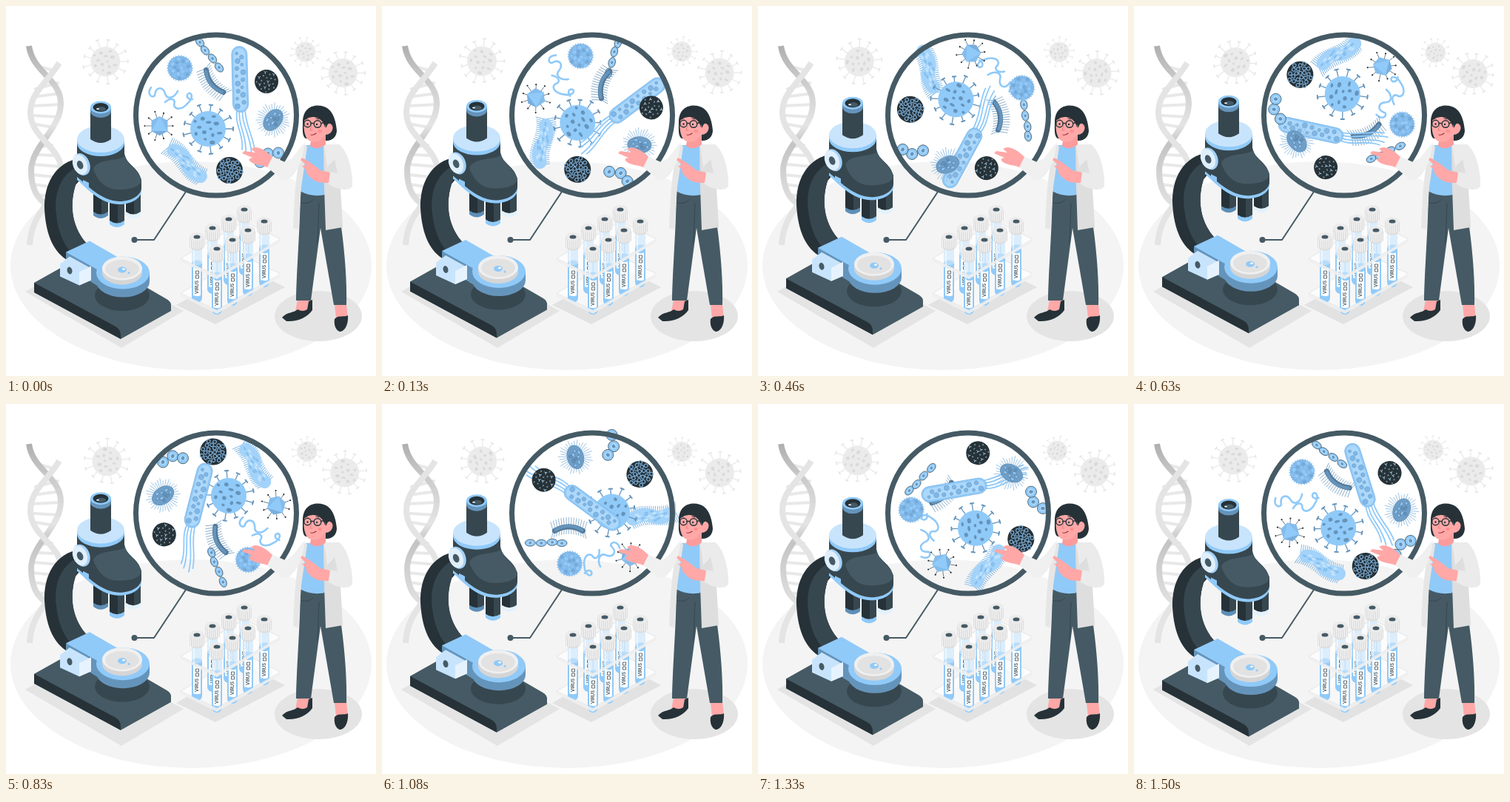
An HTML page that plays this animation: 500x500 px, repeating every 1.54 s.

```html
<!DOCTYPE html>
<html lang="en">
<head>
<meta charset="utf-8">
<title>Virus laboratory</title>
<style>
  html, body { margin: 0; height: 100%; overflow: hidden; background: #fff; }
  svg { display: block; width: 100vw; height: 100vh; }
</style>
</head>
<body>
<svg id="stage" viewBox="0 0 500 500"></svg>
<script>
const BLUE = '#90caf9', PALE = '#c8e4fc', DEEP = '#6594bb', INK = '#263238', SLATE = '#37474f', STEEL = '#455a64', SKIN = '#ffa8a7';
const HUB = [285.5, 144];

const path = (d, fill, extra = '') => `<path d="${d}" fill="${fill}" ${extra}/>`;
const line = (d, color, w = 1, cap = 'round') => path(d, 'none', `stroke="${color}" stroke-width="${w}" stroke-linecap="${cap}" stroke-linejoin="round"`);
const oval = (x, y, rx, ry, fill, extra = '') => `<ellipse cx="${x}" cy="${y}" rx="${rx}" ry="${ry}" fill="${fill}" ${extra}/>`;
const dot = (x, y, r, fill, extra) => oval(x, y, r, r, fill, extra);
const group = (transform, body) => `<g transform="${transform}">${body}</g>`;
const times = (n, f) => Array.from({ length: n }, (_, i) => f(i)).join('');
const spinner = (x, y, body, orbit = 0) => `<g class="spin" data-x="${x}" data-y="${y}" data-orbit="${orbit}">${body}</g>`;
const germ = (x, y, body) => spinner(x, y, body, 1);

// Evenly spread points on a disc (sunflower spiral)
const scatter = (n, r, f) => times(n, i => {
  const a = i * 2.4, d = r * Math.sqrt((i + .4) / n);
  return f(d * Math.cos(a), d * Math.sin(a), i);
});
const rays = (n, f) => times(n, i => group(`rotate(${i * 360 / n})`, f(i)));

function virus(r, reach, body, spot, spike) {
  const k = r / 24;
  return rays(13, i => {
    const tip = reach - (i % 3) * 1.5 * k;
    return line(`M${r - 1} 0H${tip}`, spike, 1.3 * k) + line(`M${tip} ${-2.2 * k}v${4.4 * k}`, spike, 2 * k);
  }) + dot(0, 0, r, body) +
    scatter(13, r * .86, (x, y, i) => oval(x, y, (2.2 + i % 3 * .7) * k, (1.8 + i % 2 * .8) * k, spot));
}

function dna() {
  const rungs = [[46, 82, 60, 86], [40, 112, 70, 104], [36, 123, 74, 118], [35, 135, 75, 133], [36, 148, 73, 150], [41, 160, 64, 164],
    [48, 190, 62, 188], [42, 201, 68, 202], [37, 214, 73, 217], [36, 228, 74, 232], [37, 241, 72, 246], [43, 255, 66, 258]];
  return rungs.map(([a, b, c, d]) => line(`M${a} ${b}L${c} ${d}`, '#e8e8e8', 4)).join('') +
    line('M31 54C36 90 74 98 74 132C74 166 34 190 34 222C34 248 43 260 54 268', 'url(#strand)', 8, 'butt') +
    line('M72 77C52 108 32 118 33 146C35 180 75 190 75 224C75 258 34 274 32 323', '#e4e4e4', 8, 'butt');
}

function tube(x, y) {
  return path(`M${x - 7} ${y + 12}v70a7 7 0 0 0 14 0v-70z`, '#d7ecfc', 'opacity=".85"') +
    path(`M${x - 7} ${y + 36}v46a7 7 0 0 0 14 0v-46z`, BLUE) + oval(x, y + 35, 7, 3.5, '#b9dcf9') +
    path(`M${x - 4} ${y + 16}v64`, 'none', 'stroke="#fff" stroke-width="1.5" opacity=".7"') +
    path(`M${x - 5} ${y + 41}q5 4 10 1v37q-5 3-10-1z`, '#fff') +
    `<text transform="translate(${x + 2.4} ${y + 77}) rotate(-90)" font-family="Inter,sans-serif" font-size="6" font-weight="500" fill="${INK}">VIRUS</text>` +
    path(`M${x - 1.5} ${y + 46}h4v4h-4zM${x - 1.5} ${y + 52}h4v4h-4z`, 'none', `stroke="${INK}" stroke-width=".7"`) +
    path(`M${x - 10} ${y}v14q10 9 20 0v-14z`, '#dcdcdc') +
    times(7, i => line(`M${x - 8.5 + i * 2.8} ${y + 4}v${11 + (i > 1 && i < 5)}`, '#f5f5f5', 1.2)) +
    oval(x, y, 10, 6, '#ebebeb') + oval(x, y, 4.5, 2.6, STEEL);
}

function rack() {
  const plate = y => path(`M236 ${y}L322 ${y - 50}L371 ${y - 26}L285 ${y + 23}z`, '#fff', 'stroke="#e0e0e0" opacity=".75"');
  const edge = y => path(`M236 ${y}L285 ${y + 23}L371 ${y - 26}v4L285 ${y + 28}L236 ${y + 4}z`, '#f0f0f0', 'opacity=".9"');
  const tubes = [[322, 275], [301, 288], [279, 300], [258, 312], [349, 291], [327, 303], [306, 316], [285, 328]];
  return path('M230 404L322 352L377 380L283 430z', '#e2e2e2') + plate(388) + plate(341) +
    tubes.map(p => tube(...p)).join('') + edge(388) + edge(341);
}

function objective(x, y, h, tip) {
  return path(`M${x - 10} ${y}v${h}q10 7 20 0v-${h}z`, INK) + path(`M${x + 1} ${y}v${h + 3}q6 0 9-3v-${h}z`, SLATE) +
    path(`M${x - 10} ${y + h - 3}q10 7 20 0v5q-10 8-20 0z`, tip);
}

function microscope() {
  return path('M38 374L104 337Q110 334 117 338L217 396Q224 400 223 406V412L155 450L38 387z', STEEL) +
    path('M38 374L148 433Q155 437 155 445V450L38 387z', INK) +
    oval(157, 391, 37, 21, SLATE) +
    path('M102 205C65 211 51 242 52 275C54 312 66 334 84 344L110 322C92 303 84 274 94 242L106 228z', INK) +
    path('M104 214C75 224 64 251 68 282C71 309 80 326 92 337L110 322C92 303 84 274 94 242z', SLATE) +
    group('translate(0 1.5)',
      path('M81 331L113 316L160 343L124 366z', BLUE) + path('M81 331L124 355V377L81 350z', DEEP) +
      path('M73 347L86 337L115 353V369L99 376L73 364z', PALE) + path('M99 358L115 350V369L99 376z', '#e6f3fe') +
      oval(86, 356, 3.4, 5, STEEL, 'transform="rotate(-15 86 356)"') +
      path('M122 358V371A36 21 0 0 0 194 371V358z', DEEP) + oval(158, 359, 36, 22, BLUE) +
      path('M130 353V359A27 16 0 0 0 184 359V353z', '#d5d5d5') + oval(157, 353, 27, 16, '#f0f0f0') +
      oval(157, 354, 23, 12.5, '#e2e2e2') + oval(157, 355, 6, 4, BLUE) + dot(166, 359, 1.5, BLUE) + oval(159, 354, 2, 1.2, '#fff')) +
    objective(172, 252, 29, '#e3f2fd') + objective(128, 252, 29, '#5d8fb8') + objective(150, 258, 35, BLUE) +
    path('M96 190V235C110 247 128 268 153 268C172 268 183 258 183 250V237C178 216 163 216 160 199V186z', BLUE) +
    path('M96 186V231C110 242 128 263 153 264C172 264 183 254 183 246V235C178 216 163 216 160 199V186z', SLATE) +
    path('M118 220C124 206 150 210 161 203C164 215 178 220 183 235C183 243 169 249 150 248C132 247 122 233 118 220z', STEEL) +
    path('M96 180V185A32 18 0 0 0 160 185V180z', BLUE) + oval(128, 180, 32, 18, PALE) +
    path('M114 139V180Q128 190 142 180V139z', SLATE) +
    path('M114 137V142A14 9 0 0 0 142 142V137z', DEEP) + oval(128, 137, 14, 8.5, BLUE) + oval(128, 137, 10.5, 6, INK) +
    oval(129, 139, 6, 3, STEEL) + oval(124, 139, 2, 1, '#e3f2fd') +
    group('translate(102 214) rotate(-22)', oval(0, 0, 11, 15.5, '#a4d1f7') + oval(-2, -.5, 9.5, 14, '#e0effc') + oval(-2, 0, 4, 6, STEEL)) +
    path('M104 235L112 239V245L104 241z', BLUE);
}

function woman() {
  return path('M394 397L410 397L406 413L391 413z', SKIN) + path('M444 403L460 403L462 422L446 422z', SKIN) +
    path('M373 421C380 413 389 415 394 410Q401 414 407 410L409 399L414 397V411C407 421 394 427 379 426z', INK) +
    path('M444 423C449 417 458 421 462 418C463 430 458 440 451 440C445 438 443 430 444 423z', INK) +
    path('M398 250L432 252L453 298C458 335 461 375 460 404L443 404L425 300L412 398L392 398C393 350 397 310 398 250z', STEEL) +
    line('M423 267L421 320', SLATE) + line('M399 266Q410 268 415 262', SLATE) +
    path('M405 188L430 187L434 254Q416 260 397 250z', BLUE) +
    path('M404 187C394 208 391 232 388 300L395 302L399 245L407 190z', '#e6e6e6') +
    path('M429 188L452 188L452 245L455 299L432 303L430 245z', '#dedede') +
    path('M404 185C396 190 391 206 377 211L359 203L352 217L373 235C385 237 393 223 399 211z', '#f0f0f0') +
    path('M360 204C353 197 345 191 336 191L331 193L337 198L322 196L319 199L333 205Q327 206 329 209C335 216 346 214 353 218z', SKIN) +
    path('M430 187L450 187C462 195 469 224 468 243C464 252 446 248 435 240L437 224L448 226L444 207L434 218z', '#ebebeb') +
    path('M438 225L425 222C415 214 408 209 400 205L398 208L406 215L400 216L406 222Q404 226 410 230C417 239 427 239 436 239z', SKIN) +
    path('M401 156C402 136 417 132 430 136C442 140 446 156 447 168C447 177 440 183 432 182L405 179C400 176 401 168 401 156z', INK) +
    path('M413 176L432 172V187C425 194 416 193 411 189z', '#fb9b9b') +
    path('M404 151C402 160 402 168 405 176C408 184 418 186 425 181L432 174C441 174 445 162 438 159C434 158 434 163 432 165C432 154 425 148 414 148z', SKIN) +
    path('M402 156C404 138 426 136 433 153L431 164C429 156 424 151 416 150C410 150 405 152 402 156z', INK) +
    dot(407.5, 159, 4.7, 'none', `stroke="${INK}" stroke-width="1.4"`) + dot(421, 159.5, 4.8, 'none', `stroke="${INK}" stroke-width="1.4"`) +
    line('M412 158.5H416M426 158.5L434 156.5', INK, 1.4) + dot(407.5, 159.5, 1.2, INK) + dot(420, 160, 1.2, INK) +
    line('M404 153l3-1M419 152l4 1', INK) + line('M413 161l-2 7 3 0', '#e57373', .8) + line('M412 174q4 1 7-2', '#9f3c45', 1.2) + oval(424, 169, 3, 2, '#ff8f91');
}

const cell = (x, y, a, rx, ry) => group(`translate(${x} ${y}) rotate(${a})`,
  oval(0, 0, rx, ry, BLUE, `stroke="${STEEL}" stroke-width=".8"`) + oval(0, 0, rx * .55, ry * .5, '#b5dbfa') + oval(0, 0, rx * .3, ry * .35, DEEP));

const curvedRod = () => group('rotate(-128)',
  times(15, i => {
    const x = -21 + i * 3, y = x * x / 70 - 2;
    return line(`M${x} ${y}l${x / 6} -12M${x} ${y}l${x / 9} 10`, DEEP, .7);
  }) + line('M-19 4Q0 -7 19 4', '#54799a', 7) + line('M-18 3Q0 -8 18 3', DEEP, 4));

const hairyWorm = () => group('rotate(37)',
  times(24, i => {
    const x = -32 + i * 2.7, y = 4 * Math.sin(x / 13);
    return line(`M${x} ${y}l-3 -13M${x} ${y}l-3 13`, '#84b8e3', 1);
  }) + line('M-24 -3Q-10 -8 0 0T26 3', '#a3d3fa', 18) +
  scatter(20, 20, (x, y, i) => oval(x * 1.4, y * .34 + 3 * Math.sin(x / 10), 3, 1.4, i % 2 ? '#86bfee' : '#c5e3fc')));

const flagellate = () =>
  line('M-4 8C-10 29 5 43 2 64M-1 8C-5 30 9 44 7 69M3 8C0 30 14 43 15 72M6 8C6 32 18 47 19 66', BLUE, 1.8) +
  group('rotate(-1.5)', path('M-10.5 -65a10.5 10.5 0 0 1 21 0V3a10.5 10.5 0 0 1-21 0z', BLUE, 'stroke="#7fb6e4" stroke-width=".8"') +
    path('M-8 -65a8 8 0 0 1 16 0V3a8 8 0 0 1-16 0z', '#acd8fb') +
    times(15, i => dot((i % 2 ? 3.6 : -3.6) + Math.sin(i * 4), -66 + i * 5.1, 2 + i * 7 % 3 * .7, '#7fb7e8', `stroke="${DEEP}" stroke-width=".5"`)));

const polyhedron = () =>
  rays(10, i => line('M10 0H18', STEEL, .7) + dot(18 + i % 2 * 2, 0, 1.1, INK)) +
  path('M0 -13L11 -7V7L0 13L-11 7V-7z', '#84bcec') + path('M0 -13L-11 7H11z', BLUE) + path('M-11 7H11L0 13z', '#78aedd');

const hairyOval = () => rays(34, i => line(`M9 0H${20 + i % 3 * 1.7}`, '#8dbbe2', .8)) +
  group('rotate(-52)', oval(0, 0, 16, 11, '#6f9fc8', `stroke="${DEEP}"`) +
    scatter(9, 12, (x, y, i) => oval(x, y * .65, 2 + i % 2, 2, i % 3 ? '#8fc2ee' : DEEP, `stroke="#557fa4" stroke-width=".7"`)));

const fuzzyBall = () => rays(30, () => line('M15 0H17.5', '#87b9e4')) + dot(0, 0, 16.5, '#80b8e9') +
  scatter(22, 15, (x, y, i) => dot(x, y, 2.4, ['#93c9f8', '#74a9d8', '#88c0f0'][i % 3]));

const meshBall = () => dot(0, 0, 18, INK) + scatter(23, 16.5, (x, y) => dot(x, y, 2.3, 'none', 'stroke="#7fb2de" stroke-width="1.1"'));

const darkBall = () => dot(0, 0, 16, INK) + scatter(20, 14.5, (x, y, i) =>
  i % 3 ? dot(x, y, 1.1, '#78909c') : line(`M${x - 1.5} ${y - 1}l1.5 1.5 1.5 -1.5M${x} ${y}v2`, '#a9c9e2', .9));

const squiggles = () =>
  line('M-28 -13C-34 -4 -27 2 -23 -2C-22 -15 -12 -14 -9 -5C-7 4 3 2 8 -8', BLUE, 2.6) +
  line('M-9 7C0 -1 6 4 3 10C4 19 15 16 21 9C29 2 28 -6 23 -5C18 -2 22 4 28 3', BLUE, 2.6);

const germs = [
  [275, 67, [[-13, -18], [-6, -7], [4, 4], [13, 16]].map(([x, y]) => cell(x, y, 50, 7, 4.6)).join('')],
  [224, 123, squiggles()], [235, 84, fuzzyBall()], [279, 104, curvedRod()], [207.5, 162, polyhedron()],
  [244, 212, hairyWorm()], [273, 166, virus(24, 34, BLUE, DEEP, DEEP)], [317, 130, flagellate()],
  [302, 222, meshBall()], [352, 102, darkBall()], [361, 154, hairyOval()],
  [355, 204, [[-11.5, 7], [-1, -4.5], [13, -5.5]].map(([x, y]) => cell(x, y, 0, 7.5, 7.5)).join('')]
];
const greyVirus = (x, y, r, reach) => spinner(x, y, group('translate(-1.2 -1)', virus(r, reach, '#ebebeb', '#dadada', '#e6e6e6')));

const stage = document.getElementById('stage');
stage.innerHTML = `<defs><linearGradient id="strand" x1="0" y1="55" x2="0" y2="268" gradientUnits="userSpaceOnUse">
  <stop stop-color="#b0b0b0"/><stop offset=".25" stop-color="#cfcfcf"/><stop offset=".5" stop-color="#e4e4e4"/>
  <stop offset=".62" stop-color="#c4c4c4"/><stop offset="1" stop-color="#e0e0e0"/></linearGradient></defs>` +
  oval(250, 351, 244, 141, '#f4f4f4') + path('M26 386L105 340L240 412L156 462z', '#e4e4e4') + oval(422, 419, 59, 34, '#e4e4e4') +
  dna() + greyVirus(135.5, 76, 20, 30.5) + greyVirus(405.7, 63, 13.5, 20) + greyVirus(456.7, 91.5, 19.5, 29.5) +
  germs.map(g => germ(...g)).join('') +
  dot(284, 147.5, 108.5, 'none', `stroke="${STEEL}" stroke-width="7"`) +
  line('M243 251L200 316H173', STEEL, 2) + dot(173.5, 316, 4, STEEL) +
  `<g id="scope">${microscope()}</g>` + rack() + woman();

const spins = [...stage.querySelectorAll('.spin')], scope = document.getElementById('scope');
const STEP = 1000 / 24, LOOP = 1540;
const turn = [[0, 0], [7, 64], [11, 105], [20, 188], [26, 244], [29, 280], [36, 352], [37, 360]]; // [step, degrees]

function angleAt(step) {
  const i = turn.findIndex(([s]) => s > step), [s0, a0] = turn[i - 1], [s1, a1] = turn[i];
  return a0 + (a1 - a0) * (step - s0) / (s1 - s0);
}

function draw() {
  const t = performance.now() % LOOP;
  const a = angleAt(Math.min(36, Math.floor((Math.floor(t / 10) * 10 + 5) / STEP)));
  for (const g of spins) {
    const { x, y, orbit } = g.dataset;
    g.setAttribute('transform', `rotate(${a * orbit} ${HUB}) translate(${x} ${y}) rotate(${a})`);
  }
  scope.setAttribute('transform', `translate(0 ${-9.8 * (1 - Math.abs(a / 180 - 1))})`);
  requestAnimationFrame(draw);
}
draw();
</script>
</body>
</html>
```
